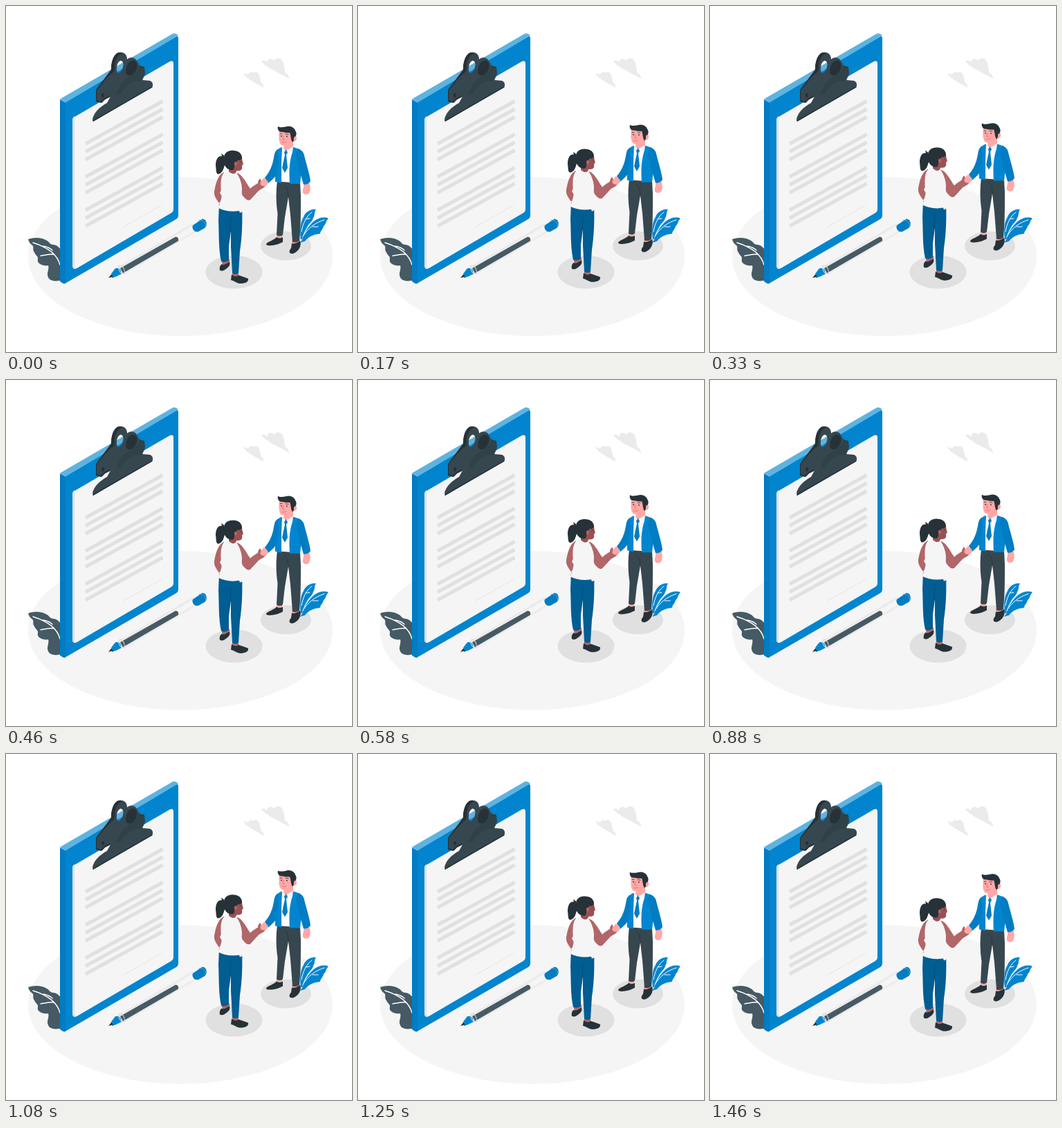
Recreate the animation shown at these times as an HTML page. Size 500x500 px, loop 1500 ms.

```html
<!DOCTYPE html>
<html lang="en">
<head>
<meta charset="utf-8">
<title>Handshake</title>
<style>
  html, body { margin: 0; width: 100%; height: 100%; overflow: hidden; background: #fff; }
  svg { display: block; width: 100%; height: 100%; }
  .blue { fill: #0285ce; }
  .deep { fill: #027cc2; }
  .ink { fill: #263238; }
  .slate { fill: #37474f; }
  .steel { fill: #455a64; }
  .paper { fill: #f5f5f5; }
  .grey { fill: #e0e0e0; }
  .cloud { fill: #ebebeb; }
  .pink { fill: #ffa8a7; }
  .brown { fill: #b16668; }
  .shade { fill: #9a5052; }
  .jeans { fill: #015d92; }
  .line { fill: none; stroke-linecap: round; stroke-linejoin: round; }
</style>
</head>
<body>
<svg viewBox="0 0 500 500">
  <ellipse cx="252" cy="362" rx="220" ry="115" class="paper"/>

  <g class="cloud">
    <path d="M369 80C372 77 376 80 377 82C377 76 384 74 387 79C391 73 400 75 401 84C403 89 402 94 404 97C407 98 409 101 409 105L385 92C381 91 380 88 377 87C374 86 373 83 369 80Z"/>
    <path d="M343 98C346 96 349 98 350 100C350 96 355 94 357 97C360 93 366 96 366 101C368 105 367 108 369 111C371 112 373 115 372 118L355 108C352 107 352 105 349 104C347 103 346 100 343 98Z"/>
  </g>

  <g id="leaf">
    <path class="steel" d="M32 337C40 334 52 334 59 339C63 341 63 345 69 345C75 346 78 350 80 354V396C71 399 63 397 61 392C58 386 63 380 61 375C53 376 44 372 46 366C47 361 42 360 41 356C37 351 42 348 37 345C34 343 33 340 32 337Z"/>
    <path class="line" stroke="#fff" stroke-width="1.4" d="M39 342C58 348 74 358 78 374M54 347C60 348 64 350 67 353M50 361C57 360 64 358 69 359"/>
  </g>

  <g id="board">
    <path class="blue" d="M86 139L246 44Q249 43 249 47V303Q249 306 246 308L87 400Q84 402 82 400Z"/>
    <path class="deep" d="M78 135L86 139.500V401Q84 402 81 400L78 398Z"/>
    <path fill="#5eb3e1" d="M78 134.500L240 40.500Q244 38 249 42.500L246 44.500L86 139.500Z"/>
    <path class="grey" d="M96 164Q96 161 99 159.500L104 160V378L100 380Q96 380 96 376Z"/>
    <path class="paper" d="M99 164Q99 160 102 158.500L237 80Q242 78 242 83V294Q242 297 239 299L104 378Q99 381 99 376Z"/>
    <g id="rows" stroke="#e0e0e0" stroke-width="5"></g>
    <path class="line" stroke="#e0e0e0" stroke-width=".8" d="M170 319L225 288"/>
  </g>

  <g id="clip">
    <path class="slate" fill-rule="evenodd" d="M130 121L143 104L152 92C152 78 157 67 165 67C171 67 175 70 175 77C180 73 186 74 189 79L193 86L200 88L201 98L197 107L208 108Q213 110 212 116L126 167L125 163C128 153 134 147 146 140L151 131L143 135L138 140L130 138ZM161 96C158 88 162 79 166 79C171 80 170 88 167 93C165 96 163 98 161 96Z"/>
    <path class="ink" d="M152 92C152 78 157 67 165 67L169 68C160 70 156 82 157 92L147 109L151 131L143 135L138 140L130 138V121L143 104Z"/>
    <path class="slate" d="M131 122L144 106L153 97L158 108L151 129L142 133L137 138L131 136Z"/>
    <path class="ink" d="M173 96C173 82 182 75 188 81C192 88 187 97 181 100C177 101 174 100 173 96Z"/>
    <path class="ink" d="M166 113C172 103 183 101 189 94L193 86L200 88L201 98L197 107L186 109C176 113 170 119 167 126L159 128Z" opacity=".3"/>
    <ellipse cx="140" cy="129" rx="2.200" ry="3" class="ink"/>
    <path class="line" stroke="#263238" stroke-width="1.500" d="M126 166L211 117"/>
  </g>

  <g id="pen">
    <path fill="#ebebeb" d="M162 377L269 314Q276 317 277 325L171 388Q164 387 162 377Z"/>
    <path class="paper" d="M167 378L269 318L274 324L171 384Z"/>
    <path class="steel" d="M165 379L245 333.500Q250 333.500 249 339.500L169 386Z"/>
    <path class="blue" d="M152 387L158 379Q166 377 167 387L159 391L153 393Z"/>
    <path class="ink" d="M148 393L152 388L155 391Z"/>
    <ellipse cx="167" cy="381" rx="3.500" ry="6.500" transform="rotate(-28 167 381)" class="line" stroke="#d6d6d6"/>
    <path class="deep" d="M270 317L283 308C290 306 292 318 287 321L278 326C272 328 268 321 270 317Z"/>
    <path class="line" stroke="#5eb3e1" stroke-width=".8" d="M279 309.500C285 308 290 314 288 319"/>
  </g>

  <ellipse cx="329.500" cy="384.500" rx="41" ry="24" class="grey"/>
  <ellipse cx="404.500" cy="346.500" rx="36.500" ry="21" class="grey"/>

  <g id="bush">
    <path class="blue" d="M426 337C424 322 426 311 430 305C433 297 441 293 448 294C445 298 447 302 444 306C443 311 438 314 436 318C432 324 429 331 428 337Z"/>
    <path class="blue" d="M428 338C431 327 437 318 445 311C451 306 460 304 466 307C462 310 463 315 459 318C458 323 454 325 454 329C446 330 438 332 432 340L425 342Z"/>
    <path class="line" stroke="#fff" stroke-width="1" d="M442 298C434 304 429 314 427 326M429 333C436 321 447 313 460 309M443 319L451 319M433 308L439 307"/>
  </g>

  <g id="pair">
    <g id="man">
      <path class="pink" d="M391 329H399V338H391ZM413 338H424V344H413Z"/>
      <path class="ink" d="M376 344C378 340 387 339 391 334C394 336 397 336 400 334V341C393 345 381 348 376 345ZM413 343C417 344 422 342 425 339C428 347 422 356 414 358C408 358 409 353 412 350Z"/>
      <path class="slate" d="M392 253L425 255L426 274C426 300 426 320 424 339C421 342 417 342 414 341L411 302L408 276L403 305L400 331C397 333 394 333 391 331L392.500 300C390 282 390 268 392 253Z"/>
      <path class="line" stroke="#263238" stroke-width=".8" d="M408 276L407 265L402 260"/>
      <path class="pink" d="M431 256L438 255C441 262 440 270 436 272C431 273 428 271 429 266Z"/>
      <path fill="#fff" d="M398 204L415 204L412 255L398 254Z"/>
      <path class="pink" d="M402 197L415 194V207L405 211L401 206Z"/>
      <path class="blue" d="M399 204C392 206 389 210 388 217L389 254L398 256L398 228ZM415 204C423 206 428 209 430 214L425 257L410 257C409 240 409 226 414 211Z"/>
      <path class="deep" d="M393 207C389 209 388 213 387 219C385 231 381 240 374 248L379 256C383 253 387 249 389 246L393 226ZM422 206C427 208 430 211 431 216C434 228 439 244 440 253C438 257 434 258 430 258L425 241C423 230 420 222 419 216Z"/>
      <path class="deep" d="M401 208L405 208L407 212L405 215L407 234L403 241L399 234L403 215Z"/>
      <path fill="#f5f5f5" d="M399 203L404 209L400 213ZM415 203L413 212L405 209Z"/>
      <path class="pink" d="M395 180C394 190 394 198 398 201C403 203 409 201 413 196C418 197 421 194 420 189C418 187 416 189 416 190L414 180Z"/>
      <path class="ink" d="M393 174C396 176 400 175 404 174.500C411 172 417 176 418 180C421 184 419 188 418 189C416 188 416 191 416 194L414 197C411 192 412 187 410 183C404 184 399 181 396 182C393 180 392 177 393 174Z"/>
      <g class="ink"><circle cx="398" cy="188" r=".9"/><circle cx="406" cy="188.500" r=".9"/></g>
      <path class="line" stroke="#263238" stroke-width=".8" d="M396 185L399 184.500M404 185L408 185.500"/>
      <path class="line" stroke="#e56f72" stroke-width=".9" d="M401 188L400 193L402 193M399 197Q402 198 405 196"/>
    </g>

    <g id="woman">
      <path class="brown" d="M315 240C306 244 303 257 301 268C300 274 304 279 308 285L314 278L309 270L315 258ZM311 366H323V375L314 378ZM327 383H336V392H327Z"/>
      <path class="ink" d="M309 382C308 377 310 374 312 373C315 376 319 371 323 370C325 375 320 379 315 382C313 383 311 383 309 382ZM326 388C331 392 334 391 336 389C341 391 346 392 350 394C351 399 345 401.500 337 401C333 400 329 397 325 396Z"/>
      <path class="jeans" d="M308 286L341 290C342 313 341 334 338 354L336 386C333 388 330 388 327 386L325 348V325L322 347L322 367C319 370 315 371 311 369C307 351 308 331 307 310Z"/>
      <path class="line" stroke="#014a78" stroke-width=".8" d="M324 326L325 306"/>
      <path class="pink" d="M373 248L379 255C378 260 373 261 368 261L364 258Z"/>
      <path class="brown" d="M332 241C341 242 346 254 353 264C357 260 361 258 364 256C364 252 367 249 368 250L369 255C373 255 375 259 374 261C371 264 367 265 365 267L353 280C349 282 346 279 342 274L335 259Z"/>
      <path class="pink" d="M370 252L378 252C378 258 375 261 371 260C367 259 366 256 370 252Z"/>
      <path class="paper" d="M317 239C322 238 329 239 333 241C338 248 341 257 341 265C340 274 341 283 342 290V297L338 299L337 296C326 298 315 296 307 292C310 281 313 276 311 269C310 259 310 248 314 242Z"/>
      <path class="shade" d="M322 230L333 229L333 239C331 244 326 243 322 239ZM329 211L340 216C342 222 341 224 343 228L341 231C342 236 340 239 333 238L326 231Z"/>
      <path class="ink" d="M315 219C315 212 322 208 329 209C337 209 341 214 341 220C339 223 336 224 335 222C334 226 332 224 330 227C330 232 331 234 328 237C322 238 318 234 316 230C314 236 313 242 306 243C303 241 304 236 303 231C303 222 306 216 312 217L311 213L315 216Z"/>
      <ellipse cx="332" cy="228" rx="2" ry="2.800" class="brown"/>
      <path class="line" stroke="#263238" stroke-width=".8" d="M338 221L340 220.500M339 224.500V225.500"/>
    </g>
  </g>
</svg>
<script>
  const rows = document.getElementById('rows');
  for (const top of [199, 247, 295]) {
    for (let i = 0; i < 3; i++) {
      const row = document.createElementNS('http://www.w3.org/2000/svg', 'path');
      const y = top + i * 11.5;
      row.setAttribute('d', `M115 ${y}L226.500 ${y - 61.5}`);
      rows.append(row);
    }
  }

  // The pair floats up and back at constant speed; the shadows stay put.
  const LOOP = 1500, RISE = 10;
  const pair = document.getElementById('pair');

  function draw(now) {
    const phase = (now % LOOP) / LOOP;
    const lift = RISE * (1 - Math.abs(1 - 2 * phase));
    pair.setAttribute('transform', `translate(0 ${-lift.toFixed(3)})`);
  }

  let start;
  function tick(now) {
    start ??= now;
    draw(now - start);
    requestAnimationFrame(tick);
  }
  draw(0);
  requestAnimationFrame(tick);
</script>
</body>
</html>
```
